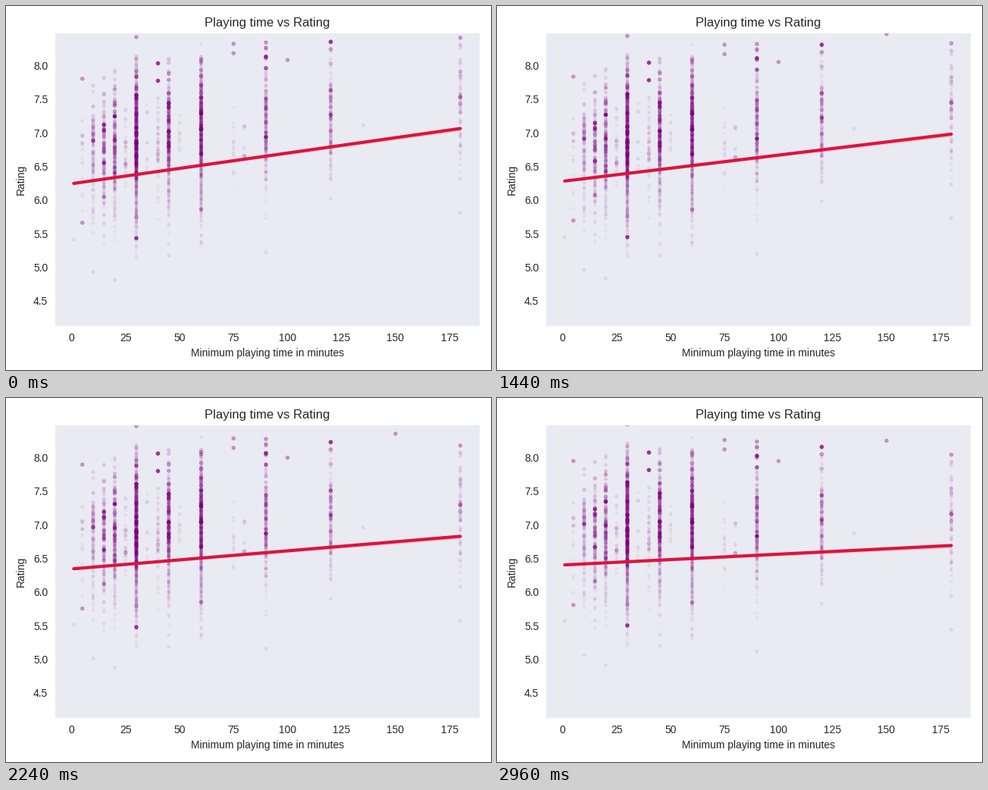
Write a matplotlib script that moves like this. It is 640 px wide and 480 px high and loops after 5000 ms.

```python
import numpy as np
import matplotlib.pyplot as plt
from matplotlib.animation import FuncAnimation

W, H, DPI = 640, 480, 100
INTERVAL, FRAMES = 40, 125
HOLD, STEPS = 25, 49

# rating removed per minute away from the pivot
SHIFT, PIVOT = 0.00295, 54
SLOPE, LEVEL = 0.00456, 6.26

plt.rcParams.update({
    "font.family": "Liberation Sans",
    "font.size": 10,
    "axes.facecolor": "#EAEAF2",
    "text.color": "0.15",
    "axes.labelcolor": "0.15",
    "xtick.color": "0.15",
    "ytick.color": "0.15",
    "ytick.alignment": "center",
})

# how many games share each playing time
COUNTS = {5: 14, 10: 95, 15: 150, 20: 190, 25: 26, 30: 560, 35: 8, 40: 42,
          45: 280, 50: 10, 60: 440, 75: 16, 80: 5, 90: 180, 120: 130, 180: 60}

# lone games, by opacity
LONE = {
    0.07: [(1, 5.43), (10, 4.95), (20, 4.83), (45, 5.19), (90, 5.24),
           (135, 7.13), (180, 5.83)],
    0.3: [(5, 7.82), (5, 5.68), (15, 6.06), (30, 8.44), (30, 5.76),
          (60, 5.88), (75, 8.34), (75, 8.2), (90, 8.36), (100, 8.1),
          (120, 8.26), (150, 8.55), (180, 8.43)],
    0.7: [(30, 5.45), (40, 8.05), (40, 7.79), (90, 8.15), (120, 8.37)],
}


def trend(x):
    return LEVEL + SLOPE * x


def shifted(x, y, k):
    return y - k * SHIFT * (x - PIVOT)


def build_games():
    rng = np.random.default_rng(12)
    parts = []
    for x, n in COUNTS.items():
        z = rng.normal(size=n)
        z = z[np.abs(z) < 2.6]
        above = 0.3 + (0.4 + 0.06 * np.log(n / 20)) * z
        # well rated games have more votes and so are more opaque
        rise = 1 / (1 + np.exp((0.12 - above) / 0.14))
        votes = rng.lognormal(0, 1.15, z.size) * 0.035 * (n / 200) ** 0.35
        alpha = rng.uniform(0.015, 0.05, z.size) + votes * rise
        parts.append(np.column_stack([np.full(z.size, x), trend(x) + above, alpha]))
    for alpha, spots in LONE.items():
        parts.append([(x, y, alpha) for x, y in spots])
    return np.vstack(parts).T


mins, ratings, alphas = build_games()
alphas = np.clip(alphas, 0, 0.85)
colors = np.column_stack([np.tile([0.5, 0, 0.5], (mins.size, 1)), alphas])
sizes = 4.5 + 4.5 * np.minimum(alphas / 0.15, 1)

fig = plt.figure(figsize=(W / DPI, H / DPI), dpi=DPI, facecolor="white")
ax = fig.add_axes([65 / W, 58 / H, 560 / W, 386 / H])
ax.set_xlim((65 - 86.5) / 2.85, (625 - 86.5) / 2.85)
ax.set_ylim(8 - 342 / 88.7, 8 + 44 / 88.7)
ax.set_xticks(range(0, 176, 25))
ax.set_yticks(np.arange(4.5, 8.1, 0.5))
ax.tick_params(axis="x", length=0, pad=6.4)
ax.tick_params(axis="y", length=0, pad=7)
ax.spines[:].set_visible(False)
ax.set_title("Playing time vs Rating", fontsize=12, pad=6.6)
ax.set_xlabel("Minimum playing time in minutes", labelpad=4.6)
ax.set_ylabel("Rating", labelpad=6.4)

dots = ax.scatter(mins, ratings, s=sizes, c=colors, linewidths=1, zorder=2)
ends = np.array([1.0, 180.0])
fit = trend(ends)
band_x = np.concatenate([ends, ends[::-1]])
band_y = np.concatenate([fit, (fit - [0.02, 0.045])[::-1]])
band, = ax.fill(band_x, band_y, color="crimson", alpha=0.15, lw=0, zorder=3)
line, = ax.plot(ends, fit, color="crimson", lw=3,
                solid_capstyle="round", zorder=4)


def update(i):
    k = min(max((i - HOLD) / STEPS, 0), 1)
    dots.set_offsets(np.column_stack([mins, shifted(mins, ratings, k)]))
    line.set_ydata(shifted(ends, fit, k))
    band.set_xy(np.column_stack([band_x, shifted(band_x, band_y, k)]))
    return dots, band, line


anim = FuncAnimation(fig, update, frames=FRAMES, interval=INTERVAL,
                     repeat=True, repeat_delay=0)
plt.show()
```
